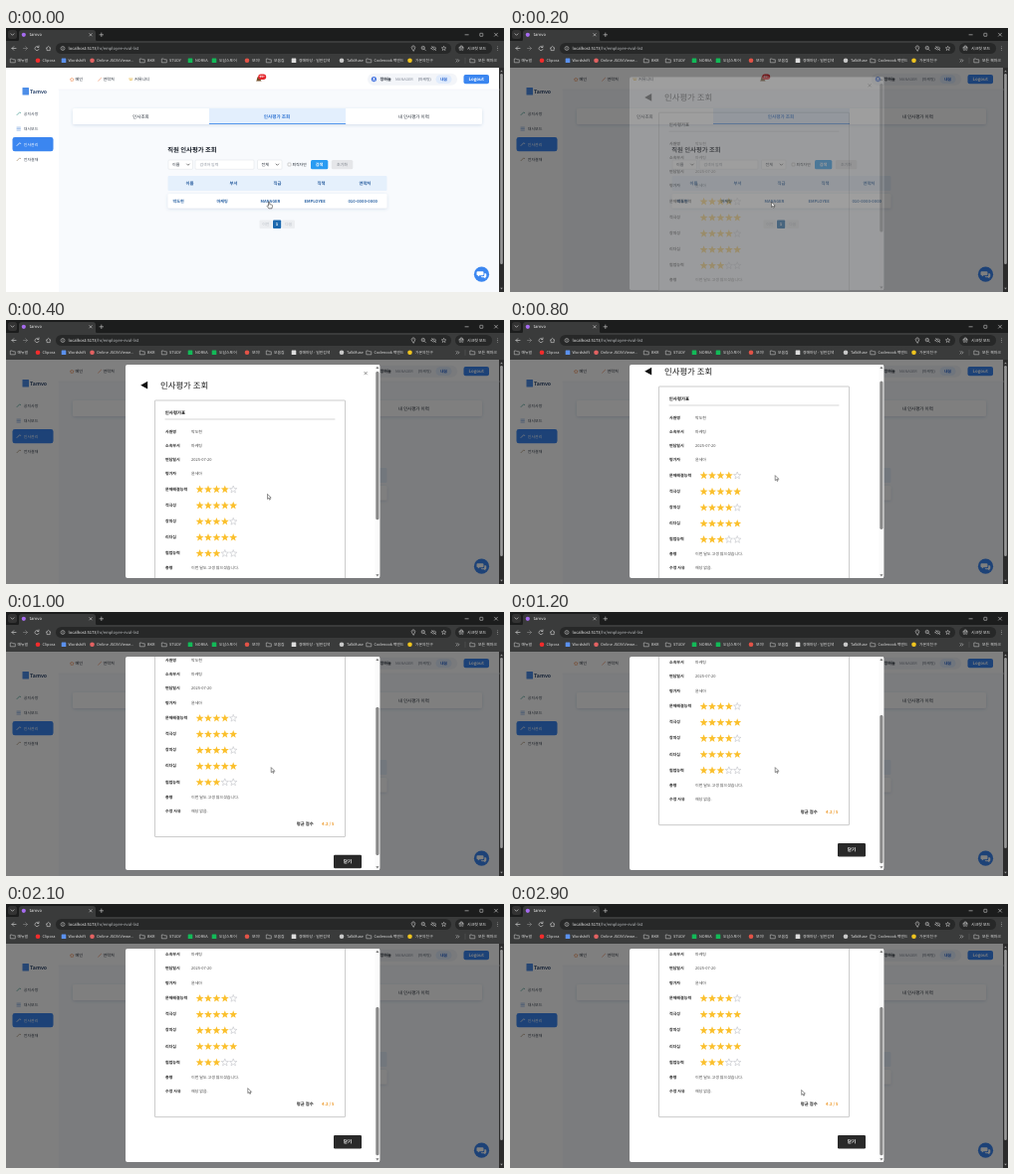
Write an HTML page that moves like this. It is 500 px wide and 266 px high and loops after 3 s.

```html
<!DOCTYPE html>
<html>
<head>
<meta charset="utf-8">
<title>tamvo</title>
<style>
html, body { margin: 0; width: 100%; height: 100%; overflow: hidden; background: #1f1f1f; }
svg { display: block; width: 500px; height: 266px; }
text { font-family: "Noto Sans CJK KR", "Noto Sans CJK", "Noto Sans", sans-serif; text-rendering: geometricPrecision; white-space: pre; }
</style>
</head>
<body>
<svg id="stage" viewBox="0 0 500 266" xmlns="http://www.w3.org/2000/svg"></svg>
<script>
const BLUE = '#3b86f0', INK = '#222a35';

// y is the vertical middle of the line
const text = (x, y, size, str, fill = INK, weight = 400, anchor = 'start') =>
  `<text x="${x}" y="${(y + size * 0.37).toFixed(2)}" font-size="${size}" fill="${fill}" font-weight="${weight}" text-anchor="${anchor}">${str}</text>`;
const mid = (x, y, size, str, fill, weight) => text(x, y, size, str, fill, weight, 'middle');
const rect = (x, y, w, h, fill, r = 0, extra = '') =>
  `<rect x="${x}" y="${y}" width="${w}" height="${h}" rx="${r}" fill="${fill}" ${extra}/>`;
const circle = (x, y, r, fill, extra = '') => `<circle cx="${x}" cy="${y}" r="${r}" fill="${fill}" ${extra}/>`;
const line = (d, color, w = 0.7) =>
  `<path d="${d}" fill="none" stroke="${color}" stroke-width="${w}" stroke-linecap="round" stroke-linejoin="round"/>`;
const shape = (d, fill, extra = '') => `<path d="${d}" fill="${fill}" ${extra}/>`;
const outline = (color, w = 0.4) => `stroke="${color}" stroke-width="${w}"`;

function folder(x, y = 32.8) {
  return line(`M${x - 2.3} ${y - 1.8}h1.6l.7.8h2.3v3h-4.6z`, '#c8c8c8', 0.55);
}

function browser() {
  const icon = '#d0d0d0';
  let s = rect(0, 0, 500, 14, '#1c1d1d') + rect(0, 13, 500, 27, '#3a3b3b');
  s += rect(2, 2, 9, 9, '#333', 2.5) + line('M5 5.8l1.5 1.5l1.5-1.5', icon);
  s += shape('M10 14q3 0 3-3V5q0-3 3-3H87q3 0 3 3V11q0 3 3 3z', '#3a3b3b');
  s += circle(17.8, 6.8, 2.1, '#a66bf0') + text(23.5, 6.8, 4.2, 'tamvo', '#eee');
  s += line('M83.8 5.6l2.4 2.4m0-2.4l-2.4 2.4M94 6.8h3.6m-1.8-1.8v3.6', icon, 0.6);
  s += line('M461 6.8h3.2M490.5 5.2l3 3m0-3l-3 3', '#e5e5e5', 0.55);
  s += rect(475.8, 5.3, 3, 3, 'none', 0.3, outline('#e5e5e5', 0.5));

  s += line('M10 20.5H6m1.8-1.8L6 20.5l1.8 1.8', icon, 0.65);
  s += line('M17.5 20.5h4m-1.8-1.8l1.8 1.8l-1.8 1.8', '#858585', 0.65);
  s += line('M32.8 19.3a2.1 2.1 0 1 0 .3 2M33 17.9v1.6h-1.6', icon, 0.6);
  s += line('M40.4 20.4l2.2-2l2.2 2M41 20v2.6h3.2V20', icon, 0.6);
  s += rect(50, 15, 397, 11, '#272828', 5.5);
  s += circle(57, 20.5, 2, 'none', outline(icon, 0.5)) + line('M57 20.3v1.2M57 19.3v.1', icon, 0.5);
  s += text(62.5, 20.5, 4.15, 'localhost:5173<tspan fill="#b9bcbf">/hr/employee-eval-list</tspan>', '#f0f0f0');
  s += line('M409 23l-1.5-2.3a1.8 1.8 0 1 1 3 0zM409 19.7v.1', icon, 0.6);
  s += circle(418.8, 20, 1.7, 'none', outline(icon, 0.55)) + line('M420 21.3l1.5 1.5M418 20h1.6', icon, 0.5);
  s += line('M427 20.5q2.5-3 5 0q-2.5 3-5 0zM427.6 18.4l4 4.2', icon, 0.55);
  s += `<path d="${starPath(439.6, 20.6, 2.4)}" fill="none" ${outline(icon, 0.5)}/>`;
  s += rect(451, 15, 37, 11, '#272828', 5.5);
  s += line('M454.8 20h4.6M455.8 19.6l.5-1.5h1.8l.5 1.5', icon, 0.7);
  s += circle(456, 21.8, 0.8, 'none', outline(icon)) + circle(458.3, 21.8, 0.8, 'none', outline(icon));
  s += text(463, 20.5, 4, '시크릿 모드', '#eee');
  for (const y of [18.8, 20.5, 22.2]) s += circle(493.7, y, 0.42, icon);

  // [icon x, label x, label, icon colour]; no colour means a folder
  const marks = [
    [7, 11.5, '매뉴얼'], [32, 36.5, 'Clipora', '#f22c2c'], [58, 62.5, 'Wordshift', '#5b91ee'],
    [86.5, 91, 'Online JSON Viewe...', '#e46262'], [137, 142, 'BKR'], [159, 164, 'STUDY'],
    [185, 190, 'NORVA', '#12ba58'], [209, 214, '도담스토어', '#12ba58'], [242, 247, '보미!', '#e35347'],
    [264, 269, '모음집'], [289, 294, '경매마당 - 일반검색', '#dedede'],
    [337, 342, 'TalkMuse', '#c9c9c9'], [364.5, 369.5, 'Codenook 백엔드'], [405.5, 411, '가온의친구', '#f0c51e']
  ];
  for (const [ix, x, label, color] of marks) {
    s += !color ? folder(ix) : ['#12ba58', '#dedede', '#5b91ee'].includes(color)
      ? rect(ix - 2.3, 30.5, 4.6, 4.6, color, 0.4) : circle(ix, 32.8, 2.3, color);
    s += text(x, 32.8, 3.85, label, '#dedede');
  }
  s += line('M452 31.5l1.2 1.3l-1.2 1.3m1.8-2.6l1.2 1.3l-1.2 1.3', icon, 0.5);
  s += line('M461 30.2v5.2', '#666', 0.4) + folder(468.5) + text(474, 32.8, 3.95, '모든 북마크', '#dedede');

  s += rect(495, 40, 5, 226, '#2c2c2c') + rect(496.2, 46, 2.6, 192, '#9a9a9a', 1.3);
  s += shape('M496.2 44.3h2.6l-1.3-1.8zM496.2 261.7h2.6l-1.3 1.8z', '#9a9a9a');
  return s;
}

function select(x, label) {
  return rect(x, 133, 24.5, 9.3, '#fff', 1, outline('#d4d8de')) + text(x + 4, 137.6, 4, label)
    + line(`M${x + 18.6} 137l1.3 1.3l1.3-1.3`, '#222', 0.6);
}

function page() {
  let s = rect(0, 40, 495, 226, '#fff') + rect(53, 62, 442, 204, '#f8fafd');
  s += line('M53 62H495', '#eceff4', 0.5);

  s += line('M64.6 51.6l1.6-1.6l1.6 1.6m-2.8-.3v2h2.4v-2', '#f0935c', 0.6) + text(69.6, 51.5, 4.1, '메인', INK, 500);
  s += line('M92.6 53.2l3-3', '#f2a17e', 0.8) + text(97.5, 51.5, 4.1, '연락처', INK, 500);
  s += line('M123.6 51h3.4m-2.6 1.4h2', '#e7bd54', 0.8) + text(129, 51.5, 4.1, '커뮤니티', INK, 500);
  s += shape('M251 53.5q1-1 1-2.5q0-2 1.8-2t1.8 2q0 1.5 1 2.5z', '#75512b');
  s += rect(253.2, 46.5, 8, 5.4, '#e4262c', 2.7) + mid(257.2, 49.2, 3.1, '99+', '#fff', 600);

  s += rect(363, 45.7, 90, 12, '#f3f5f9', 6);
  s += circle(369.4, 51.6, 2.6, '#4775df') + circle(369.4, 50.9, 0.85, '#fff') + line('M368 52.9q1.4-1.3 2.8 0', '#fff', 0.6);
  s += text(375.5, 51.6, 4.1, '정하늘', INK, 600) + text(391, 51.6, 3.8, 'MANAGER', '#858c99');
  s += text(413.8, 51.6, 3.8, '(마케팅)', '#5d6675');
  s += rect(431.5, 47.3, 16, 8.6, '#e0ebfc', 4.3) + mid(439.5, 51.6, 3.9, '내꿈', '#2865cf', 600);
  s += rect(459.5, 47, 25.5, 9.3, BLUE, 2) + mid(472.2, 51.6, 4.4, 'Logout', '#fff', 600);

  s += rect(16.5, 60, 6.5, 7.6, '#4d8ee8', 0.5) + text(24, 64, 5.2, 'Tamvo', '#29446c', 600);
  s += rect(6.5, 110, 41, 14.3, BLUE, 2.4);
  [['공지사항', 86.2], ['대시보드', 101.6], ['인사관리', 117.1], ['전자결재', 132.3]].forEach(([label, y], i) => {
    const on = i === 2;
    const tint = on ? '#fff' : ['#5ca7a0', '#8fb3e5', '', '#b39c80'][i];
    s += line(i === 1 ? `M11 ${y}h3.4m-3.4-1.5h3.4m-3.4 3h3.4` : `M11 ${y + 1.4}l2.8-2.8l.8.8`, tint, 0.8);
    s += text(17.8, y, 3.95, label, on ? '#fff' : '#3f4856', 500);
  });

  s += rect(67, 81, 411, 16, '#fff', 1.6, 'filter="url(#soft)"');
  s += rect(204, 81, 137, 16, '#e3effd') + rect(204, 96, 137, 1, '#5798ed');
  s += mid(135.4, 89, 4.5, '인사조회', INK, 500) + mid(272, 89, 4.6, '인사평가 조회', '#2e73d2', 600)
    + mid(409.3, 89, 4.5, '내 인사평가 이력', INK, 500);

  s += text(162.3, 122.5, 6.3, '직원 인사평가 조회', '#161c26', 700);
  s += select(163, '이름') + rect(190, 133, 59, 9.3, '#fff', 1, outline('#d4d8de'))
    + text(194.5, 137.6, 3.9, '검색어 입력', '#8d949f') + select(252.5, '전체');
  s += rect(283, 136, 3, 3, '#fff', 0.5, outline('#777', 0.35)) + text(287.4, 137.6, 3.9, '퇴직자만');
  s += rect(306, 133, 17.3, 9.3, '#299bf2', 1.5) + mid(314.6, 137.6, 4.1, '검색', '#fff', 600);
  s += rect(326.8, 133, 21.5, 9.3, '#e5e6e9', 1.5) + mid(337.5, 137.6, 4, '초기화', '#7c828b');

  s += rect(162.5, 149, 220, 15, '#e5f0fc', 1);
  s += rect(162.5, 167, 220, 14.4, '#fff', 1.5, 'filter="url(#soft)"');
  const head = ['이름', '부서', '직급', '직책', '연락처'];
  const row = ['박도현', '마케팅', 'MANAGER', 'EMPLOYEE', '010-0000-0000'];
  head.forEach((h, i) => {
    s += mid(184.4 + i * 44, 156.6, 4.3, h, '#255b9d', 600);
    s += text(167.4 + i * 44, 174.1, 4.1, row[i], '#2b63a4', 600);
  });
  s += rect(254.5, 193.4, 12.5, 8.6, '#eceef1', 1) + mid(260.8, 197.7, 3.8, '이전', '#b7bcc4');
  s += rect(268, 193.4, 8.2, 8.6, '#1c68ae', 1) + mid(272.1, 197.7, 4.2, '1', '#fff', 600);
  s += rect(277.4, 193.4, 12.5, 8.6, '#eceef1', 1) + mid(283.7, 197.7, 3.8, '다음', '#b7bcc4');

  s += circle(477.5, 248.2, 7.6, BLUE);
  s += shape('M473.5 245.2h5q1 0 1 1v2q0 1-1 1h-3l-1.6 1.3v-1.3h-.4q-1 0-1-1v-2q0-1 1-1z', '#fff');
  s += shape('M480.3 247.2h1q1 0 1 1v2q0 1-1 1v1.2l-1.5-1.2h-2q-.8 0-1-.9h2.2q1.3 0 1.3-1.3z', '#fff');
  return s;
}

function starPath(x, y, r) {
  let d = '';
  for (let i = 0; i < 10; i++) {
    const a = i * Math.PI / 5 - Math.PI / 2, q = i % 2 ? r * 0.42 : r;
    d += (i ? 'L' : 'M') + (x + q * Math.cos(a)).toFixed(2) + ' ' + (y + q * Math.sin(a)).toFixed(2);
  }
  return d + 'Z';
}

function report() {
  let s = line('M359.8 52.3l2.6 2.6m0-2.6l-2.6 2.6', '#555', 0.6);
  s += shape('M142.2 61.8v7.8l-7-3.9z', '#111') + text(155, 66, 8.4, '인사평가 조회', '#1b1b1b', 500);
  s += rect(149.5, 81, 191, 209.2, '#fff', 0.5, outline('#aaa', 0.6));
  s += text(159.8, 93.2, 4.4, '인사평가표', '#111', 700) + line('M160 100H330', '#c5c5c5', 0.7);
  const rows = [
    ['사원명', 112.2, '박도현'], ['소속부서', 126.3, '마케팅'], ['면담일시', 140.6, '2025-07-20'], ['평가자', 154.8, '윤세아'],
    ['문제해결능력', 170.3, 4], ['적극성', 186.5, 5], ['창의성', 202.6, 4], ['리더십', 218.7, 5], ['협업능력', 234.8, 3],
    ['총평', 249.8, '이번 달도 고생 많으셨습니다.'], ['수정 사유', 264, '해당 없음.']
  ];
  for (const [label, y, value] of rows) {
    s += text(160, y, 4, label, '#252525', 600);
    if (typeof value === 'string') s += text(186, y, 4, value, '#4b4b4b');
    else for (let i = 0; i < 5; i++) {
      const full = i < value;
      s += shape(starPath(194.6 + i * 8.4, y + 0.5, full ? 4.2 : 3.8), full ? '#fbc02d' : '#fff',
        full ? '' : outline('#aeb2b8', 0.45));
    }
  }
  s += text(291.8, 277.2, 4.3, '평균 점수', '#222', 700) + text(317, 277.2, 4.3, '4.2 / 5', '#ee9a2c', 600);
  s += rect(329, 308.5, 28, 13.5, '#292929', 1.2) + mid(343, 315.2, 4.6, '닫기', '#fff', 600);
  return s;
}

const stage = document.getElementById('stage');
stage.innerHTML = `
<defs>
  <filter id="soft" x="-10%" y="-40%" width="120%" height="200%"><feDropShadow dx="0" dy="1" stdDeviation="1.6" flood-color="#4a6fa5" flood-opacity=".2"/></filter>
  <clipPath id="frame">${rect(120, 45, 255.5, 215, '#fff', 2)}</clipPath>
</defs>
${browser()}${page()}
<rect id="shade" x="0" y="40" width="495" height="226" fill="#000"/>
<g id="modal"><g clip-path="url(#frame)">
  ${rect(120, 45, 255.5, 215, '#fff')}
  <g id="body">${report()}</g>
  ${rect(370.3, 45, 5.2, 215, '#fbfbfb')}
  ${shape('M371.3 48.9h3.2l-1.6-2.2zM371.3 256.3h3.2l-1.6 2.2z', '#777')}
  <rect id="thumb" x="371.3" y="51.8" width="3.2" height="149.5" rx="1.6" fill="#898989"/>
</g></g>
<g id="arrow">${shape('M0 0v5l1.2-1l.8 1.8l.9-.4l-.8-1.7h1.6z', '#fff', outline('#111', 0.45))}</g>
<g id="hand">${shape('M263.5 175.4q.8-.6 1.2.2v2l2.1.5q.8.3.7 1.1l-.5 2.6h-3.2l-1.7-2.5q.2-.9 1.4-.1z', '#fff', outline('#111', 0.5))}</g>`;

const el = id => document.getElementById(id);
const parts = Object.fromEntries(['shade', 'modal', 'body', 'thumb', 'arrow', 'hand'].map(id => [id, el(id)]));
const shift = (node, x, y) => node.setAttribute('transform', `matrix(1 0 0 1 ${x} ${y})`);

// keys: [time, value]; linear unless an ease is given
function track(keys, t, ease = k => k) {
  if (t <= keys[0][0]) return keys[0][1];
  for (let i = 1; i < keys.length; i++) {
    const [t0, a] = keys[i - 1], [t1, b] = keys[i];
    if (t <= t1) return a + (b - a) * ease((t - t0) / (t1 - t0));
  }
  return keys[keys.length - 1][1];
}
const smooth = k => k * k * (3 - 2 * k);

const scrollKeys = [[700, 0], [800, 14], [900, 42], [1000, 63.7], [1100, 72.5], [1200, 75.6]];
const fadeKeys = [[200, 0.24], [300, 0.85], [400, 1]];
const dropKeys = [[200, 4.2], [300, 0.8], [400, 0]];
const xKeys = [[400, 262.5], [800, 266.2], [1400, 266.2], [1900, 242.8], [2300, 242.8], [2800, 292.7]];
const yKeys = [[400, 175.4], [800, 156.6], [1400, 156.6], [1900, 185.6], [2300, 185.6], [2800, 187.4]];

function draw(now) {
  const t = Math.floor((now % 3000) / 100) * 100;
  const open = t >= 200, scroll = track(scrollKeys, t);
  parts.shade.setAttribute('opacity', open ? 0.5 : 0);
  parts.modal.setAttribute('opacity', open ? track(fadeKeys, t) : 0);
  shift(parts.modal, 0, track(dropKeys, t));
  shift(parts.body, 0, -scroll);
  shift(parts.thumb, 0, scroll * 0.688);
  shift(parts.arrow, track(xKeys, t, smooth), track(yKeys, t, smooth));
  parts.arrow.setAttribute('opacity', open ? 1 : 0);
  parts.hand.setAttribute('opacity', open ? 0 : 1);
}

const start = performance.now();
function tick() {
  draw(performance.now() - start);
  requestAnimationFrame(tick);
}
tick();
</script>
</body>
</html>
```
